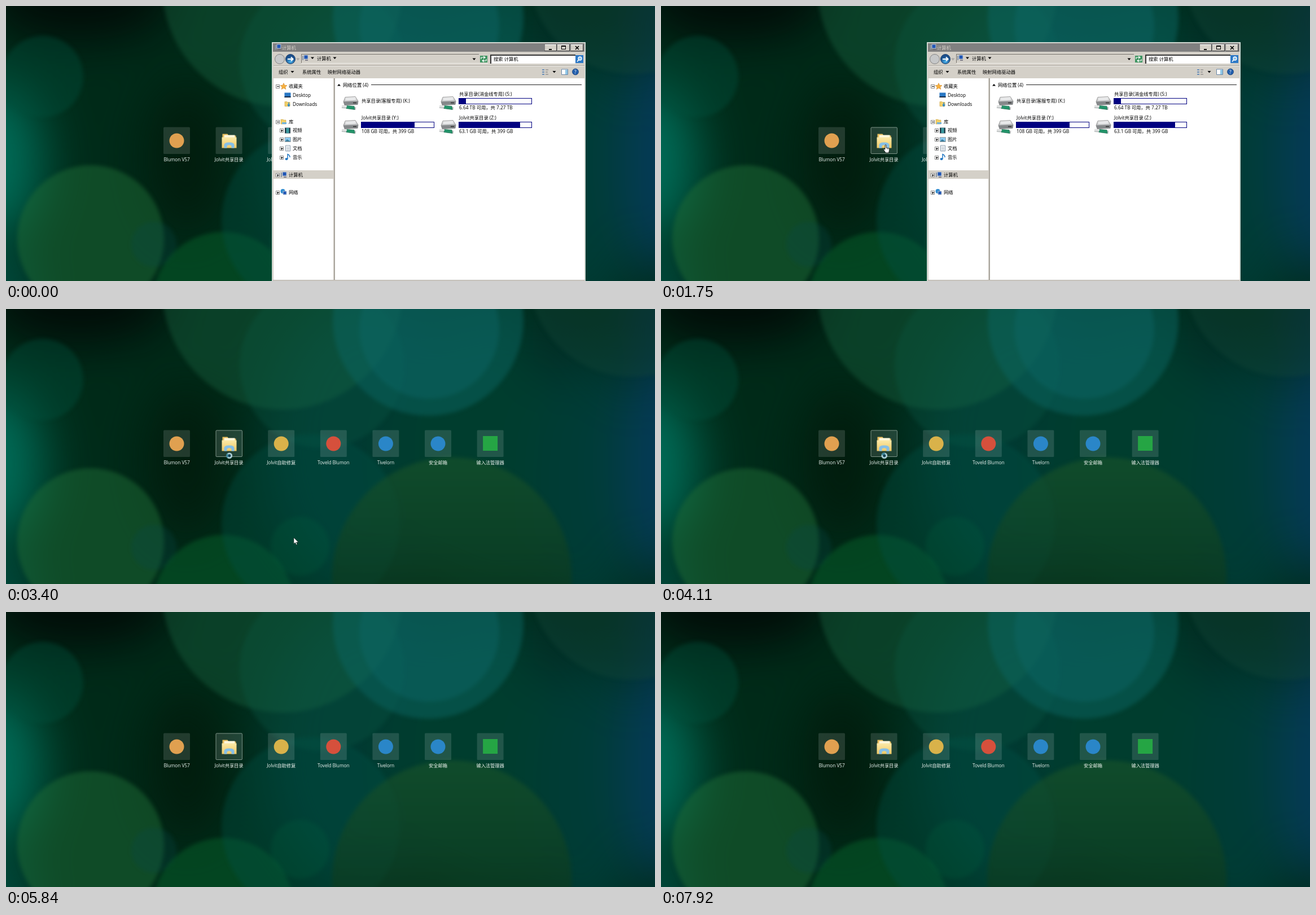
Recreate the animation shown at these times as an HTML page. Size 1150x487 px, loop 8000 ms.

```html
<!DOCTYPE html>
<html lang="zh-CN">
<head>
<meta charset="utf-8">
<title>Desktop</title>
<style>
html, body { margin: 0; width: 100%; height: 100%; overflow: hidden; background: #012b19; }
svg { display: block; width: 1150px; height: 487px; }
text { font: 8.3px "Open Sans", "Noto Sans CJK SC", "Noto Sans CJK", sans-serif; white-space: pre; }
filter { color-interpolation-filters: sRGB; }
.label { fill: #eef4f0; text-anchor: middle; letter-spacing: -.08px; }
.crisp { shape-rendering: crispEdges; }
.anim { animation: 8s step-end infinite; }
#window { animation-name: window; }
#hover { animation-name: hover; }
#arrow { animation-name: arrow; }
#hand { animation-name: hand; }
#ring { animation-name: ring; }
#spin { animation-name: spin; }
@keyframes window { 0% { visibility: visible } 28.125%, 100% { visibility: hidden } }
@keyframes hover { 0% { opacity: 0 } 19.625% { opacity: 1 } 84%, 100% { opacity: 0 } }
@keyframes arrow {
  0% { transform: translate(-50px, -50px) }
  5% { transform: translate(548px, 425px) }
  7.125% { transform: translate(486px, 352px) }
  9.25% { transform: translate(420px, 282px) }
  11.375% { transform: translate(368px, 240px) }
  13.5% { transform: translate(352px, 227px) }
  15.625% { transform: translate(376px, 236px) }
  17.875% { transform: translate(392px, 243px) }
  19.625% { transform: translate(-50px, -50px) }
  38.5% { transform: translate(395px, 246px) }
  42.5% { transform: translate(510px, 405px) }
  44.625% { transform: translate(-50px, -50px) }
  96.875% { transform: translate(1120px, 485px) }
  99%, 100% { transform: translate(-50px, -50px) }
}
@keyframes hand {
  0% { transform: translate(-50px, -50px) }
  19.625% { transform: translate(392px, 243px) }
  21.875% { transform: translate(394px, 245px) }
  34.25%, 100% { transform: translate(-50px, -50px) }
}
@keyframes ring {
  0% { transform: translate(-50px, -50px) }
  34.25% { transform: translate(363.5px, 217.5px) }
  36.375% { transform: translate(400px, 262px) }
  38.5% { transform: translate(395.7px, 259.7px) }
  73%, 100% { transform: translate(-50px, -50px) }
}
@keyframes spin {
  0% { transform: rotate(-180deg) }
  48.875% { transform: rotate(-150deg) }
  51.125% { transform: rotate(-120deg) }
  53.375% { transform: rotate(-90deg) }
  55.625% { transform: rotate(-60deg) }
  58% { transform: rotate(-30deg) }
  60.25% { transform: rotate(0deg) }
  64.625% { transform: rotate(60deg) }
  66.75% { transform: rotate(120deg) }
  68.875% { transform: rotate(180deg) }
  70.875%, 100% { transform: rotate(240deg) }
}
</style>
</head>
<body>
<svg viewBox="0 0 1150 487">
  <defs>
    <filter id="haze" x="-20%" y="-50%" width="140%" height="200%"><feGaussianBlur stdDeviation="45"/></filter>
    <filter id="soft" x="-10%" y="-10%" width="120%" height="120%"><feGaussianBlur stdDeviation="3.5"/></filter>
    <linearGradient id="metal" x2="0" y2="1"><stop stop-color="#f4f4f4"/><stop offset="1" stop-color="#8c8f92"/></linearGradient>
    <linearGradient id="paper" x2="0" y2="1"><stop stop-color="#fbe9a8"/><stop offset="1" stop-color="#efc865"/></linearGradient>
    <linearGradient id="moss" x2="0" y2="1"><stop stop-color="#1a552a"/><stop offset=".55" stop-color="#0e3a1c"/></linearGradient>
    <radialGradient id="blue" cy=".75"><stop stop-color="#49b4ee"/><stop offset="1" stop-color="#1b4f8c"/></radialGradient>
    <path id="down" d="M-3 -1.5H3L0 2Z"/>
    <g id="plus" class="crisp"><path d="M-3 -3H3V3H-3Z" fill="#fff" stroke="#888"/><path d="M-2 0H2M0 -2V2" stroke="#000"/></g>
    <g id="minus" class="crisp"><path d="M-3 -3H3V3H-3Z" fill="#fff" stroke="#888"/><path d="M-2 0H2" stroke="#000"/></g>
    <g id="pc"><path d="M-2 -5H5V2H-2Z" fill="#1f55b5" stroke="#b9c4d0"/><path d="M0 4H5" stroke="#667" stroke-width="1.5"/><path d="M-5 -4H-3V4H-5Z" fill="#8b98a8"/></g>
    <g id="folder"><path d="M-5 -4H-1L0 -3H4V4H-5Z" fill="#f2d069" stroke="#c79d35" stroke-width=".6"/></g>
    <g id="drive">
      <path d="M-9 -10L9 -11L14 -3L13 3L-10 4L-12 -2Z" fill="url(#metal)" stroke="#777" stroke-width=".7"/>
      <path d="M-12 -2L14 -3L13 3L-10 4Z" fill="#85888a"/>
      <path d="M-7 -8L8 -9L10 -5L-9 -4Z" fill="#e9eaeb"/>
      <path d="M5 0H11" stroke="#333" stroke-width="1.6"/>
      <path d="M-15 7L-4 8L10 10" stroke="#c4c8c8" stroke-width="5" fill="none"/>
      <path d="M-6 5L7 6L8 12L-7 10Z" fill="#23946a" stroke="#176447" stroke-width=".6"/>
      <path d="M-15 6L-6 7" stroke="#f1f1f1" stroke-width="1.5"/>
    </g>
  </defs>

  <rect width="1150" height="487" fill="#012b19"/>
  <g filter="url(#haze)">
    <ellipse cx="640" cy="240" rx="180" ry="260" fill="#003a32"/>
    <ellipse cx="870" cy="260" rx="190" ry="260" fill="#003d2e"/>
    <ellipse cx="1030" cy="320" rx="90" ry="260" fill="#003c36"/>
    <ellipse cx="975" cy="50" rx="50" ry="70" fill="#012a24"/>
    <ellipse cx="1170" cy="270" rx="75" ry="210" fill="#053a58"/>
    <ellipse cx="1170" cy="10" rx="70" ry="70" fill="#052c3c"/>
    <ellipse cx="-20" cy="275" rx="85" ry="140" fill="#006c58"/>
    <ellipse cx="-10" cy="500" rx="55" ry="60" fill="#00574c"/>
    <ellipse cx="130" cy="-20" rx="170" ry="80" fill="#010b07"/>
    <ellipse cx="320" cy="270" rx="70" ry="140" fill="#011c0d"/>
  </g>
  <g filter="url(#soft)">
    <circle cx="490" cy="-35" r="213" fill="#1d6a45" fill-opacity=".36"/>
    <circle cx="560" cy="100" r="146" fill="#0a5a48" fill-opacity=".3"/>
    <circle cx="748" cy="20" r="169" fill="#0a6460" fill-opacity=".5"/>
    <circle cx="750" cy="35" r="124" fill="#0c6866" fill-opacity=".42"/>
    <circle cx="1110" cy="-65" r="185" fill="#14483a" fill-opacity=".35"/>
    <circle cx="65" cy="125" r="72" fill="#00503c" fill-opacity=".4"/>
    <circle cx="150" cy="412" r="130" fill="#1f6c36" fill-opacity=".5"/>
    <circle cx="262" cy="422" r="40" fill="#0a4a4a" fill-opacity=".28"/>
    <circle cx="385" cy="525" r="125" fill="#06602a" fill-opacity=".5"/>
    <circle cx="540" cy="380" r="158" fill="#005448" fill-opacity=".35"/>
    <circle cx="521" cy="420" r="52" fill="#006a40" fill-opacity=".2"/>
    <circle cx="790" cy="475" r="212" fill="url(#moss)" fill-opacity=".6"/>
  </g>

  <g id="tiles"></g>
  <g transform="translate(395.5 238.5)">
    <path d="M-12 -12H-3L-1 -9H12V12H-12Z" fill="#e8bd5c"/>
    <path d="M-9 -10H10V2H-9Z" fill="#fff7dc"/>
    <path d="M-13 -6H13V13H-13Z" fill="url(#paper)"/>
    <path d="M-9 13V8Q-9 3 0 3T9 8V13H4V9Q0 6 -4 9V13Z" fill="#86bfe6"/>
  </g>
  <rect id="hover" class="anim" x="372" y="215" width="46.5" height="46.5" rx="1.5" fill="none" stroke="#b9c8bd" stroke-opacity=".6"/>

  <g id="window" class="anim">
    <g class="crisp">
      <path d="M471 64H1027V487H471Z" fill="#d4d0c8"/>
      <path d="M471.5 487V64.5H1026.5V487" fill="none" stroke="#cfe0da"/>
      <path d="M473 66H1025V81H473Z" fill="#808080"/>
      <path d="M474 128H580V485H474ZM583 128H1025V485H583Z" fill="#fff"/>
      <path d="M581.5 128V485" stroke="#aaa69e" stroke-width="2"/>
      <path d="M473 485.5H1026" stroke="#b5b1aa"/>
      <path d="M474 105.5H1025" stroke="#aaa69e"/>
      <path d="M474 106.5H1025" stroke="#f1efeb"/>
      <path d="M474 291H580V306H474Z" fill="#d4d0c8"/>
      <path d="M955 68H976V80H955ZM977 68H999V80H977ZM1001 68H1023V80H1001Z" fill="#d4d0c8"/>
      <path d="M955 68.5H975M977 68.5H998M1001 68.5H1022" stroke="#fff"/>
      <path d="M954 79.5H976M977 79.5H999M1001 79.5H1023M975.5 68V80M998.5 68V80M1022.5 68V80" stroke="#404040"/>
      <path d="M962 76.5H967" stroke="#000" stroke-width="2"/>
      <path d="M984.5 71.5H991.5V76.5H984.5ZM984 70.5H992" fill="none" stroke="#000"/>
      <path d="M523.5 102V85.5H838" fill="none" stroke="#77736d"/>
      <path d="M523 101.5H855" stroke="#f4f2ee"/>
      <path d="M858 86H1009V102H858Z" fill="#fff"/>
      <path d="M858.5 102V86.5H1009" fill="none" stroke="#333" stroke-width="2"/>
      <path d="M1009 87H1023V101H1009Z" fill="#2d79c7"/>
      <path d="M647 139.5H1020" stroke="#222"/>
    </g>
    <path d="M1009 71L1015 77M1015 71L1009 77" stroke="#000" stroke-width="1.6"/>
    <use href="#pc" x="482" y="73"/>
    <circle cx="485" cy="94" r="8.5" fill="#c6c8c9" stroke="#858585"/>
    <circle cx="504" cy="94" r="8.5" fill="url(#blue)" stroke="#23436b"/>
    <path d="M499 94H508M505 90.5L508.5 94L505 97.5" fill="none" stroke="#fff" stroke-width="2"/>
    <path d="M515 93L517.3 96L519.5 93Z" fill="none" stroke="#888" stroke-width=".8"/>
    <use href="#pc" x="530" y="92"/>
    <use href="#down" x="543" y="92"/><use href="#down" x="582.5" y="92"/><use href="#down" x="829.5" y="94"/>
    <use href="#down" x="507.5" y="116.5"/><use href="#down" x="971.5" y="116.5"/>
    <path d="M840 88H853V100H840Z" fill="#3d9460"/>
    <path d="M842 94V91H848M846 89L849 91L846 93M851 94V97H845M847 95L844 97L847 99" fill="none" stroke="#fff" stroke-width="1.2"/>
    <circle cx="1017" cy="93" r="3" fill="#8cc4f0" stroke="#fff" stroke-width="1.3"/>
    <path d="M1015 95L1012 98.5" stroke="#fff" stroke-width="1.7"/>
    <path d="M950 113H954M950 117H954M950 121H954" stroke="#6a8fb8" stroke-width="2"/>
    <path d="M956 113H961M956 117H960M956 121H961" stroke="#777"/>
    <path d="M984.5 112H995.5V121.5H984.5Z" fill="#fff" stroke="#6987a8"/>
    <path d="M991 113H995V121H991Z" fill="#8fc6e6"/>
    <circle cx="1009" cy="116.5" r="5.5" fill="#225fad" stroke="#16396b" stroke-width=".7"/>
    <text x="1007" y="119.7" fill="#fff" font-weight="700">?</text>

    <path d="M492 136.5L493.7 140.3L498 140.7L494.8 143.5L495.8 147.5L492 145.3L488.2 147.5L489.2 143.5L486 140.7L490.3 140.3Z" fill="#f6b03e" stroke="#cf852a" stroke-width=".6"/>
    <path d="M493.5 153.5H504.5V162H493.5Z" fill="#2877c4"/><path d="M493.5 161H504.5" stroke="#1b2e49" stroke-width="2"/>
    <use href="#folder" x="499" y="173.5"/><path d="M501 171V176M499 174.5L501 177.5L503 174.5" fill="none" stroke="#2788d0" stroke-width="1.5"/>
    <use href="#folder" x="492" y="205"/><path d="M489 206H497V209H489Z" fill="#6fb3dd"/>
    <path d="M494 215.5H504V225.5H494Z" fill="#283f4c"/><path d="M496.5 216H501.5V225H496.5Z" fill="#3a9aa0"/>
    <path d="M494 232.5H504.5V240.5H494Z" fill="#8cc8ee" stroke="#a5a5a5"/><path d="M494.5 240L498 236L504 240Z" fill="#3b7e9e"/>
    <path d="M495.5 247H503.5V257H495.5Z" fill="#fff" stroke="#8496a8"/><path d="M497 250H502M497 252.5H502M497 255H502" stroke="#8496a8" stroke-width=".8"/>
    <path d="M499 271V262.5Q503 264 503 268" fill="none" stroke="#2378c4" stroke-width="1.5"/><ellipse cx="497" cy="271" rx="2.5" ry="2" fill="#2378c4"/>
    <use href="#pc" x="492" y="299"/>
    <circle cx="490.5" cy="328" r="4" fill="#2f8cd0"/><path d="M491 328H497V334H491Z" fill="#1f55b5" stroke="#b9c4d0"/>
    <path d="M587 141.5H593L590 138Z"/>
    <g id="details"></g>
  </g>

  <g id="ring" class="anim">
    <circle r="4" fill="#123f50" stroke="#b9dce4" stroke-width="2.6"/>
    <g id="spin" class="anim"><path d="M2.8 -2.8A4 4 0 0 1 2.8 2.8" fill="none" stroke="#2f8198" stroke-width="2.6"/></g>
  </g>
  <g id="hand" class="anim">
    <path d="M3 1.2Q4 0 5 1.2V6L9.5 7Q11 7.5 10.7 9.5L9.5 15H4.2L.5 9.5Q.5 7.8 3 9Z" fill="#fff" stroke="#111" stroke-width=".8"/>
    <path d="M6.7 7V9M8.5 7.5V9.5" stroke="#333" stroke-width=".6"/>
  </g>
  <path id="arrow" class="anim" d="M0 0V10.8L2.5 8.5L4.3 12.5L6 11.8L4.3 8H8Z" fill="#fff" stroke="#111" stroke-width=".5"/>
</svg>
<script>
const $ = id => document.getElementById(id);
const text = (x, y, s, attrs = '') => `<text x="${x}" y="${y + 3}" ${attrs}>${s}</text>`;
const use = (id, x, y) => `<use href="#${id}" x="${x}" y="${y}"/>`;

// Desktop tiles: label and plain mark colour
const tiles = [
  ['Blumon V57', '#e0a050'], ['Jolvit共享目录'], ['Jolvit自助修复', '#d9b24a'],
  ['Toveld Blumon', '#d6503c'], ['Tivelorn', '#2a86c8'], ['安全邮箱', '#2a86c8'],
  ['输入法管理器', '#25a544', true]
];
$('tiles').innerHTML = tiles.map(([name, color, square], i) => {
  const x = 302.5 + 92.6 * i;
  const mark = !color ? '' : square
    ? `<rect x="${x - 13}" y="225" width="26" height="26" fill="${color}"/>`
    : `<circle cx="${x}" cy="238.5" r="13" fill="${color}"/>`;
  return `<rect x="${x - 23.5}" y="214.5" width="47" height="47.5" rx="1.5" fill="#fff" fill-opacity=".13"/>`
    + mark + text(x, 271.5, name, 'class="label"');
}).join('');

const labels = [
  [489, 73.5, '计算机', 'fill="#d4d0c8"'], [551, 92.5, '计算机'], [864, 94, '搜索 计算机'],
  [483, 117, '组织'], [525, 117, '系统属性'], [570, 117, '映射网络驱动器'],
  [501, 142, '收藏夹'], [508, 158, 'Desktop'], [508, 173.5, 'Downloads'],
  [501, 205, '库'], [508, 220, '视频'], [508, 236, '图片'], [508, 252, '文档'], [508, 267.5, '音乐'],
  [501, 299, '计算机'], [501, 330, '网络'], [597, 139.5, '网络位置 (4)']
];
// Drives: x, y, name, used width, capacity
const drives = [
  [630, 168, '共享目录(客服专用) (K:)'],
  [803, 168, '共享目录(消金线专用) (S:)', 12, '6.64 TB 可用，共 7.27 TB'],
  [630, 210, 'Jolvit共享目录 (Y:)', 94, '108 GB 可用，共 399 GB'],
  [803, 210, 'Jolvit共享目录 (Z:)', 108, '63.1 GB 可用，共 399 GB']
];
const drive = ([x, y, name, used, size]) => use('drive', x - 20, y + 3.5) + (used
  ? text(x, y - 12, name) + text(x, y + 12, size)
    + `<g class="crisp"><rect x="${x - .5}" y="${y - 4.5}" width="129" height="10" fill="#fff" stroke="#000080"/>`
    + `<rect x="${x}" y="${y - 4}" width="${used}" height="9" fill="#000080"/></g>`
  : text(x, y, name));
$('details').innerHTML = labels.map(a => text(...a)).join('') + drives.map(drive).join('')
  + [142.5, 205.5].map(y => use('minus', 481.5, y)).join('')
  + [299.5, 330.5].map(y => use('plus', 481.5, y)).join('')
  + [220.5, 236.5, 252.5, 268.5].map(y => use('plus', 488.5, y)).join('');
</script>
</body>
</html>
```
